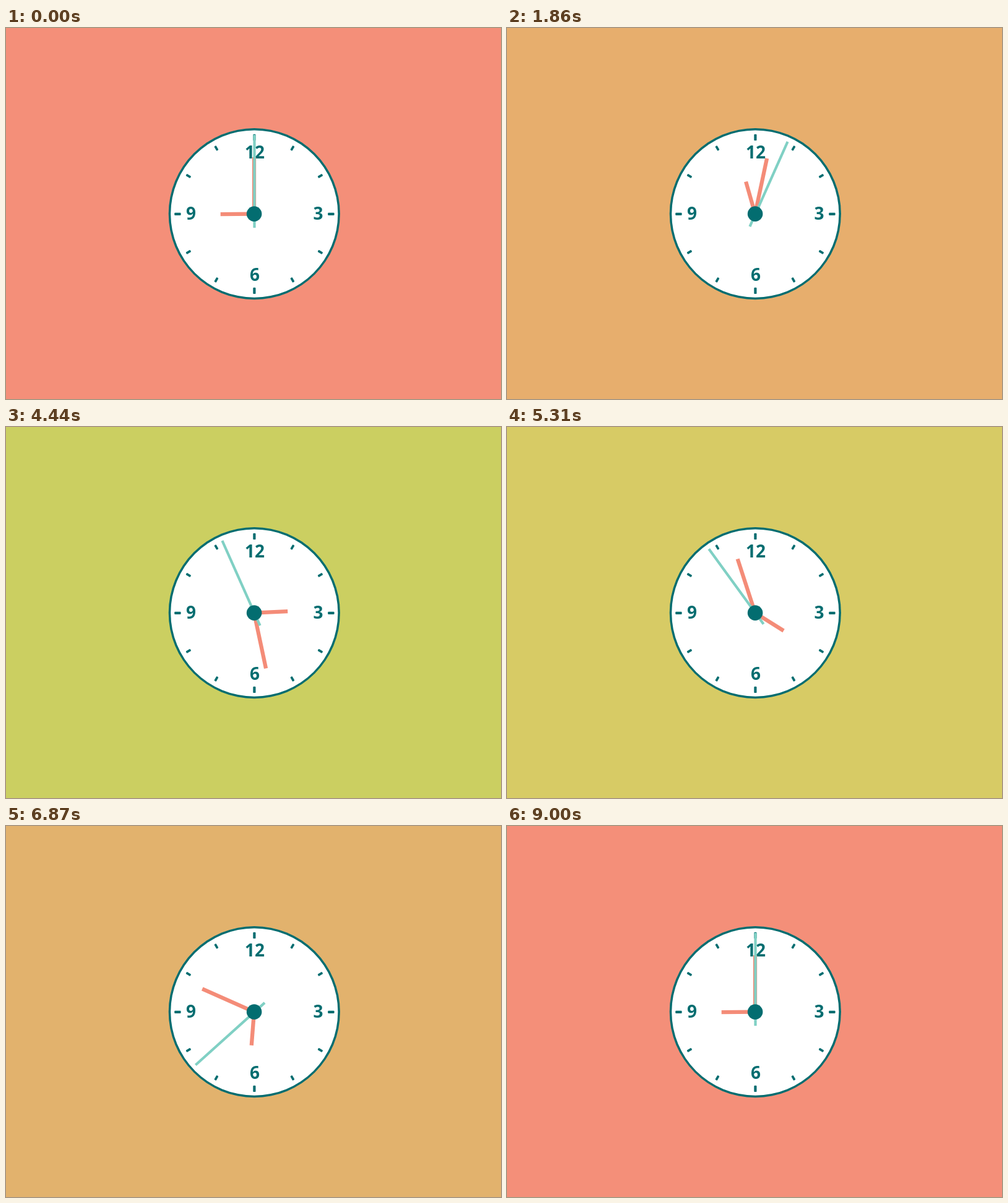
Recreate the animation shown at these times as an HTML page with a canvas. Size 800x600 px, loop 9.03 s.

```html
<!DOCTYPE html>
<html lang="en">
<head>
<meta charset="utf-8">
<title>Clock</title>
<style>
  html, body { margin: 0; width: 100%; height: 100%; overflow: hidden; }
  canvas { display: block; width: 800px; height: 600px; }
</style>
</head>
<body>
<canvas id="stage" width="800" height="600"></canvas>
<script>
const ctx = document.getElementById('stage').getContext('2d');
const LOOP = 9030, STEP = 30, TURN = 9000;
const TAU = Math.PI * 2;
const TEAL = '#036d70', CORAL = '#f48c78', MINT = '#80d0c4';

// Background colour stops: time in ms, then red, green, blue
const SKY = [
  [0, 244, 143, 121],
  [1860, 231, 174, 109],
  [3090, 219, 198, 106],
  [4500, 202, 207, 97],
  [5310, 215, 203, 101],
  [6870, 226, 178, 109],
  [9000, 244, 143, 121]
];

function skyAt(t) {
  let i = 1;
  while (i < SKY.length - 1 && t > SKY[i][0]) i++;
  const a = SKY[i - 1], b = SKY[i];
  const p = (t - a[0]) / (b[0] - a[0]);
  const mix = k => Math.round(a[k] + (b[k] - a[k]) * p);
  return `rgb(${mix(1)}, ${mix(2)}, ${mix(3)})`;
}

function disc(x, y, r, color) {
  ctx.fillStyle = color;
  ctx.beginPath();
  ctx.arc(x, y, r, 0, TAU);
  ctx.fill();
}

function spun(x, y, turns, draw) {
  ctx.save();
  ctx.translate(x, y);
  ctx.rotate(turns * TAU);
  draw();
  ctx.restore();
}

function tick(i) {
  const long = i % 3 === 0;
  const len = long ? 10.4 : 8.2, r = long ? 124 : 123, w = long ? 4.2 : 3.8;
  spun(401.4, 300.9, i / 12, () => {
    ctx.fillStyle = TEAL;
    ctx.beginPath();
    ctx.roundRect(-w / 2, -r - len / 2, w, len, 1.2);
    ctx.fill();
  });
}

function hand(x, y, turns, tip, tail, w, color) {
  spun(x, y, turns, () => {
    ctx.fillStyle = color;
    ctx.fillRect(-w / 2, -tip, w, tip + tail);
  });
}

function face() {
  disc(401.3, 300.6, 138.6, TEAL);
  disc(401.3, 300.6, 135.1, '#fff');
  for (let i = 0; i < 12; i++) tick(i);
  ctx.fillStyle = TEAL;
  ctx.font = 'bold 28px "Open Sans", "Noto Sans", sans-serif';
  ctx.textAlign = 'center';
  ctx.textBaseline = 'alphabetic';
  ctx.fillText('12', 402, 211.3);
  ctx.fillText('3', 504.5, 309.8);
  ctx.fillText('6', 402, 409.2);
  ctx.fillText('9', 299, 309.8);
}

function render(t) {
  const p = t / TURN;
  ctx.fillStyle = skyAt(t);
  ctx.fillRect(0, 0, 800, 600);
  face();
  hand(401, 300.7, p + 0.749, 54.3, 0, 6.3, CORAL);
  hand(401, 300.6, p * 5, 91.7, 0, 6.3, CORAL);
  hand(401.5, 300.8, p * 10, 128, 22.3, 4.2, MINT);
  disc(401.1, 300.6, 12.3, TEAL);
}

function loop() {
  const t = performance.now() % LOOP;
  render(Math.floor(t / STEP) * STEP);
  requestAnimationFrame(loop);
}
loop();
</script>
</body>
</html>
```
